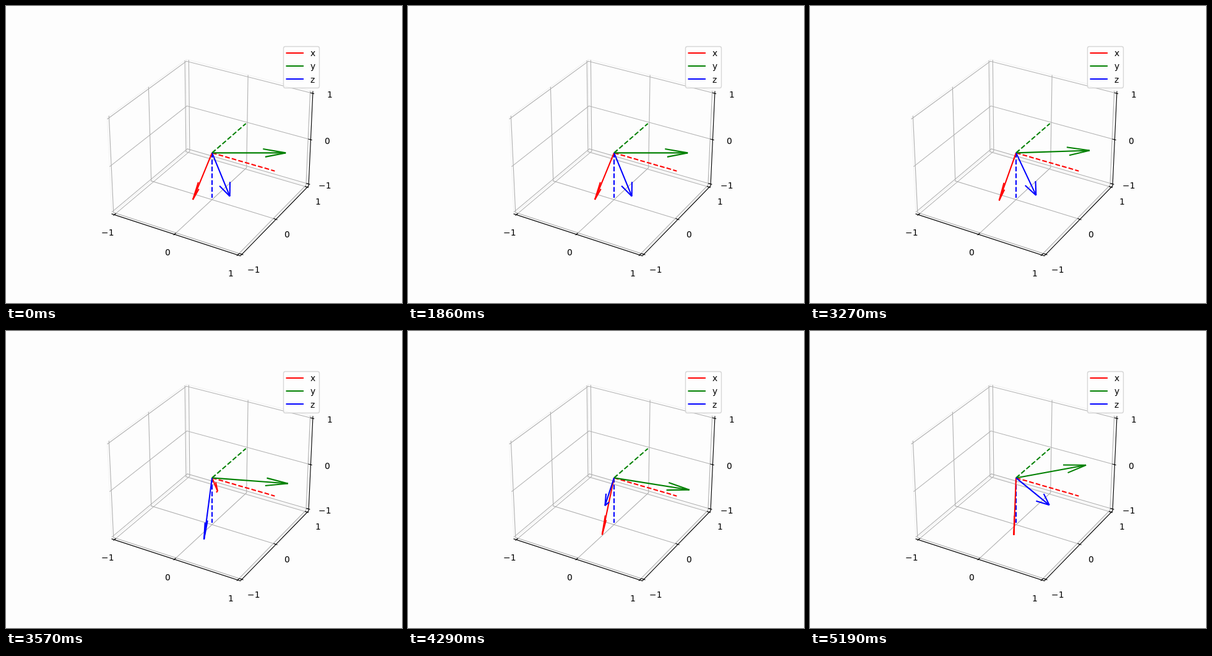
Animation of 640x480 px, one loop 8 s. Source, as an HTML page with a canvas:

```html
<!DOCTYPE html>
<html>
<head>
<meta charset="utf-8">
<style>
html, body { margin: 0; width: 100%; height: 100%; overflow: hidden; background: #fdfdfd; }
canvas { display: block; }
</style>
</head>
<body>
<canvas id="stage" width="640" height="480"></canvas>
<script>
const ctx = document.getElementById('stage').getContext('2d');
const LOOP = 8000, STEP = 30;
const EDGE = 25 / 24, TICKS = [-1, 0, 1];
const THIN = 1.11, THICK = 2.08;
const REACH = 1.087, BARB = Math.PI / 12;
const COLORS = ['#ff0000', '#008000', '#0000ff'];
const { sin, cos } = Math;

// Turning points of the sensor, in radians as the camera sees it:
// roll lifts the y arrow, turn swings it forward, spin rotates x and z about it.
const KEYS = [
  { at: 3060, roll: 0, turn: .343, spin: -.785 },
  { at: 3270, roll: .037, turn: .345, spin: -.805 },
  { at: 3540, roll: -.08, turn: -.08, spin: -.2 },
  { at: 3870, roll: -.477, turn: -.437, spin: -.32 },
  { at: 4500, roll: -.09, turn: .1, spin: -1.35 },
  { at: 4710, roll: -.063, turn: .313, spin: -1.013 },
  { at: 4890, roll: .2, turn: .425, spin: -1.096 }
];

// Perspective camera: elevation 30, azimuth -60, distance 10, box 4:4:3
function project([x, y, z]) {
  const right = .49487 * x + .28571 * y;
  const up = -.14286 * x + .24744 * y + .37115 * z;
  const near = .24744 * x - .42857 * y + .21429 * z;
  const scale = 1997.84 / (10 - near);
  return [333 + right * scale, 237.4 - up * scale];
}

function line(color, width, ...points) {
  ctx.strokeStyle = color;
  ctx.lineWidth = width;
  ctx.beginPath();
  points.forEach(p => ctx.lineTo(...project(p)));
  ctx.stroke();
}

function text(s, x, baseline) {
  ctx.fillStyle = '#000';
  ctx.font = '13.89px "DejaVu Sans", sans-serif';
  ctx.fillText(s, Math.round(x), Math.round(baseline));
}

function label(value, point) {
  const s = String(value).replace('-', '\u2212');
  const [x, y] = project(point);
  text(s, x - ctx.measureText(s).width / 2, y + 10.55);
}

function drawAxes() {
  const e = EDGE, out = e + 1 / 60, inn = e - 1 / 30, far = e + .18;
  const grid = (color, t) => {
    line(color, THIN, [t, -e, -e], [t, e, -e], [t, e, e]);
    line(color, THIN, [e, t, -e], [-e, t, -e], [-e, t, e]);
    line(color, THIN, [-e, -e, t], [-e, e, t], [e, e, t]);
  };
  [-e, e].forEach(t => grid('#f3f3f3', t));
  TICKS.forEach(t => grid('#b0b0b0', t));

  ctx.lineCap = 'square';
  line('#000', THIN, [-e, -e, -e], [e, -e, -e], [e, e, -e], [e, e, e]);
  for (const t of TICKS) {
    line('#000', THIN, [t, -out, -e], [t, -inn, -e]);
    line('#000', THIN, [out, t, -e], [inn, t, -e]);
    line('#000', THIN, [out, e, t], [inn, e, t]);
    label(t, [t, -far, -far]);
    label(t, [far, t, -far]);
    label(t, [far, far, t]);
  }
  ctx.lineCap = 'butt';
}

function drawLegend() {
  ctx.beginPath();
  ctx.roundRect(448.5, 65.5, 58, 67, 3);
  ctx.fillStyle = 'rgba(255,255,255,.8)';
  ctx.fill();
  ctx.strokeStyle = 'rgba(204,204,204,.8)';
  ctx.lineWidth = 1.39;
  ctx.stroke();
  COLORS.forEach((color, i) => {
    ctx.fillStyle = color;
    ctx.fillRect(452.5, 75 + 21 * i, 28.5, 2);
    text('xyz'[i], 492, 81 + 21.3 * i);
  });
}

function drawArrow(color, d) {
  const flat = Math.hypot(d[0], d[1]) || 1e-6;
  const side = [-d[2] * d[0] / flat, -d[2] * d[1] / flat, flat];
  line(color, THICK, [0, 0, 0], d);
  for (const sign of [-1, 1])
    line(color, THICK, d, d.map((v, i) =>
      v - .3 * (cos(BARB) * v + sign * sin(BARB) * side[i])));
}

function anglesAt(t) {
  const next = KEYS.findIndex(k => k.at > t);
  if (next < 0) return KEYS[KEYS.length - 1];
  if (next === 0) return KEYS[0];
  const a = KEYS[next - 1], b = KEYS[next];
  const k = (t - a.at) / (b.at - a.at), ease = k * k * (3 - 2 * k);
  const mix = name => a[name] + (b[name] - a[name]) * ease;
  return { roll: mix('roll'), turn: mix('turn'), spin: mix('spin') };
}

// Camera directions (right, up, near) to plot coordinates
const toPlot = ([r, u, n]) => [
  .866 * r - .305 * u + .3962 * n,
  .5 * r + .5283 * u - .6862 * n,
  .7924 * u + .61 * n
].map(v => v * REACH);

function arrowsAt(t) {
  const { roll, turn, spin } = anglesAt(t);
  const y = [cos(roll) * cos(turn), sin(roll), cos(roll) * sin(turn)];
  const front = [-sin(turn), 0, cos(turn)];
  const top = [-sin(roll) * cos(turn), cos(roll), -sin(roll) * sin(turn)];
  const x = front.map((f, i) => cos(spin) * f + sin(spin) * top[i]);
  const z = front.map((f, i) => sin(spin) * f - cos(spin) * top[i]);
  return [x, y, z].map(toPlot);
}

function draw(t) {
  ctx.fillStyle = '#fdfdfd';
  ctx.fillRect(0, 0, 640, 480);
  drawAxes();
  ctx.setLineDash([7.7, 3.33]);
  [[1, 0, 0], [0, 1, 0], [0, 0, -1]].forEach((p, i) => line(COLORS[i], THICK, [0, 0, 0], p));
  ctx.setLineDash([]);
  arrowsAt(t).forEach((d, i) => drawArrow(COLORS[i], d));
  drawLegend();
}

const start = performance.now();
function tick() {
  const t = (performance.now() - start) % LOOP;
  draw(Math.floor(t / STEP) * STEP);
  requestAnimationFrame(tick);
}
tick();
</script>
</body>
</html>
```
